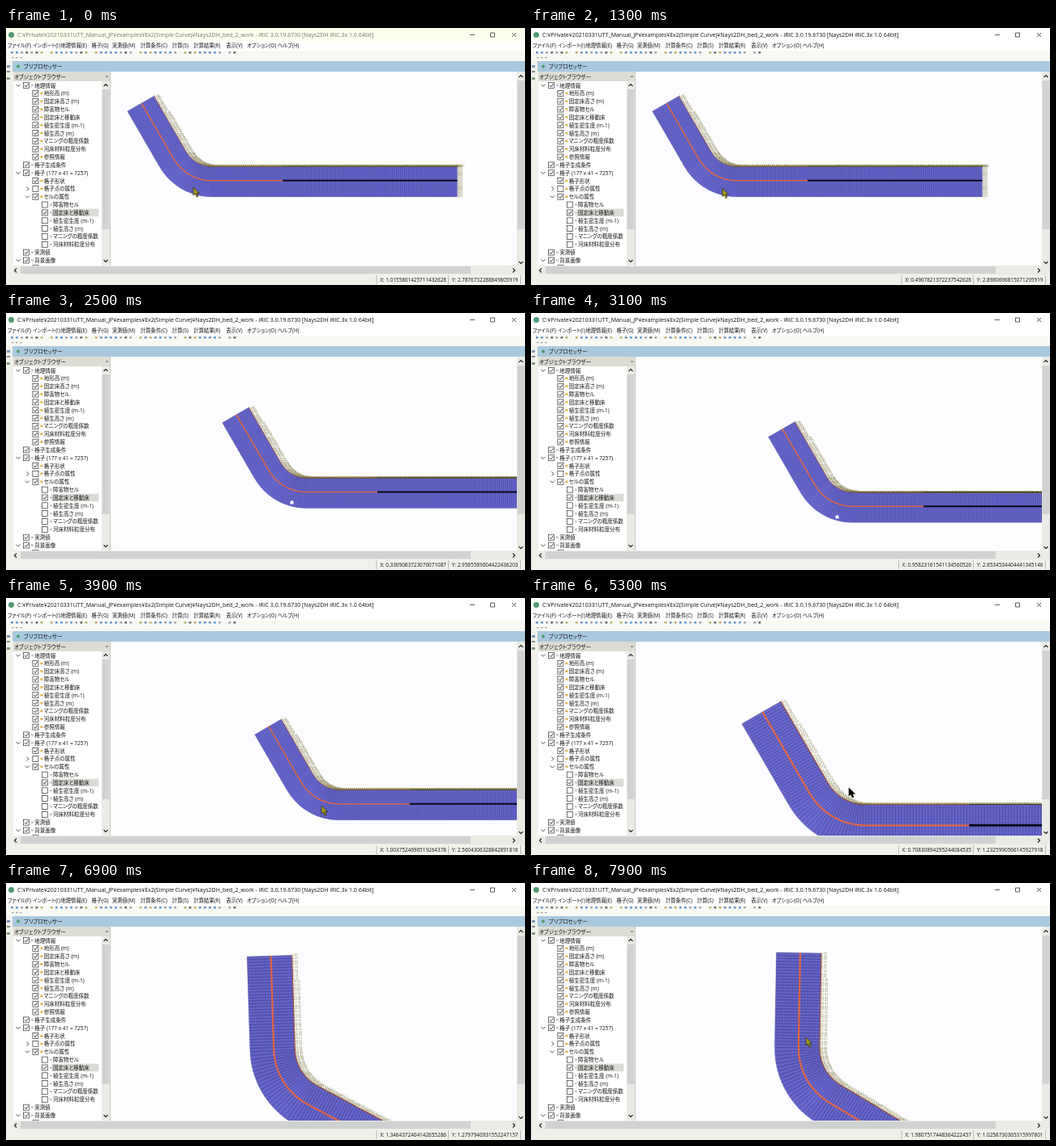
Animation of 640x318 px, one loop 8000 ms. Source, as an HTML page with a canvas:

```html
<!DOCTYPE html>
<html lang="ja">
<head>
<meta charset="utf-8">
<style>
  html, body { margin: 0; width: 100%; height: 100%; overflow: hidden; background: #fff; }
  canvas, svg { position: absolute; left: 0; top: 0; }
  text { font: 6.5px "Open Sans", "Noto Sans CJK JP", "Noto Sans CJK", sans-serif; font-feature-settings: "palt"; fill: #111; }
  .title { font-size: 6.97px; }
  .menu { font-size: 6.3px; }
  .status { font-size: 6.4px; text-anchor: end; }
</style>
</head>
<body>
<canvas id="view" width="640" height="318"></canvas>
<svg id="ui" width="640" height="318" viewBox="0 0 640 318"></svg>
<script>
const ctx = document.getElementById('view').getContext('2d');
const ui = document.getElementById('ui');

// ---- window chrome ----
const FACE = '#f1f1ec', TRACK = '#ebebe6', THUMB = '#d0d2d2';

function add(tag, attrs, content) {
  const el = document.createElementNS('http://www.w3.org/2000/svg', tag);
  for (const key in attrs) el.setAttribute(key, attrs[key]);
  if (content) el.textContent = content;
  return ui.appendChild(el);
}
const rect = (x, y, width, height, fill, extra) => add('rect', { x, y, width, height, fill, ...extra });
const line = (d, stroke = '#333', width = 0.8) => add('path', { d, stroke, 'stroke-width': width, fill: 'none' });
const label = (x, y, content, extra) => add('text', { x, y, ...extra }, content);

const titleBar = rect(0, 0, 640, 16, '#fff');
add('circle', { cx: 6.5, cy: 8.5, r: 3.5, fill: '#4f9a72' });
const title = label(14, 11, 'C:¥Private¥20210331UTT_Manual_JP¥examples¥Ex2(Simple Curve)¥Nays2DH_bed_2_work - iRIC 3.0.19.6730 [Nays2DH iRIC.3x 1.0 64bit]', { class: 'title' });
line('M572 8.5h6M597.5 6h5v5h-5zM624 6l5 5m0-5l-5 5');

rect(0, 16, 640, 12, '#fff');
[[2, 'ファイル(F)'], [33, 'インポート(I)'], [67.5, '地理情報(E)'], [105.5, '格子(G)'], [131, '実測値(M)'],
 [166, '計算条件(C)'], [205, '計算(S)'], [231.5, '計算結果(R)'], [271.5, '表示(V)'], [297, 'オプション(O)'],
 [335, 'ヘルプ(H)']].forEach(([x, name]) => label(x, 24.3, name, { class: 'menu' }));

rect(0, 28, 640, 13, '#f9f9f4');
const iconColors = ['#5d84b8', '#555', '#4b8fd0', '#b5a55a', '#8f9cab'];
for (let i = 0; i < 46; i++) {
  if (i % 9 !== 7) rect(6 + i * 6.1, 29.3, 2.8, 2.2, iconColors[(i * 7 + (i >> 2)) % 5]);
}
for (let i = 0; i < 3; i++) rect(7 + i * 5, 36.2, 2.5, 1, '#888');

rect(0, 41, 9, 264, FACE);
rect(1, 46, 4, 3, '#7b96b5');
rect(1, 53, 4, 2, '#888');
rect(1, 61, 4, 3, '#7f9b77');
rect(8, 41, 632, 13, '#a9c9de');
add('circle', { cx: 15, cy: 47.5, r: 2, fill: '#4f9a72' });
label(22, 50.3, 'プリプロセッサー');
rect(9, 54, 120, 12, '#dcdcd4');
label(10, 62.5, 'オブジェクトブラウザー');
rect(123, 59.5, 3, 1, '#555');
rect(10, 66, 108, 228, '#fff');
rect(118, 66, 10, 228, TRACK);
rect(118.5, 76, 9, 173, THUMB);
rect(128, 54, 1, 240, '#c9c9c4');
rect(630, 54, 10, 240, TRACK);
rect(630.5, 65, 9, 184, THUMB);
rect(9, 294, 631, 11, TRACK);
rect(18, 295, 555, 9, THUMB);
line('M120.5 72l2.5-2.5 2.5 2.5M120.5 287l2.5 2.5 2.5-2.5M632.5 61l2.5-2.5 2.5 2.5M632.5 289l2.5 2.5 2.5-2.5M13 297.5l-2.5 2.5 2.5 2.5M625 297.5l2.5 2.5-2.5 2.5', '#222', 1.1);

// Each row: indent level, checked, arrow (v open, > closed), name
const tree = `0 1 v 地理情報
1 1 - 地形高 (m)
1 1 - 固定床高さ (m)
1 1 - 障害物セル
1 1 - 固定床と移動床
1 1 - 植生密生度 (m-1)
1 1 - 植生高さ (m)
1 1 - マニングの粗度係数
1 1 - 河床材料粒度分布
1 1 - 参照情報
0 1 - 格子生成条件
0 1 v 格子 (177 x 41 = 7257)
1 1 - 格子形状
1 0 > 格子点の属性
1 1 v セルの属性
2 0 - 障害物セル
2 1 - 固定床と移動床
2 0 - 植生密生度 (m-1)
2 0 - 植生高さ (m)
2 0 - マニングの粗度係数
2 0 - 河床材料粒度分布
0 1 - 実測値
0 1 v 背景画像`;
tree.split('\n').forEach((row, i) => {
  const [, level, checked, arrow, name] = row.match(/(\d) (\d) (\S) (.*)/);
  const x = 25 + level * 11.4, y = 71 + i * 9.84;
  if (i === 16) rect(x + 8.5, y - 4.8, 58, 9.6, '#dadad6');
  rect(x - 3.5, y - 3.5, 7, 7, '#fff', { stroke: '#333', 'stroke-width': 0.7 });
  if (+checked) line(`M${x - 2} ${y}l1.6 1.8 2.8-3.7`, '#222', 0.9);
  if (arrow === 'v') line(`M${x - 12.5} ${y - 1.2}l2.5 2.5 2.5-2.5`, '#222');
  if (arrow === '>') line(`M${x - 11} ${y - 2.5}l2.5 2.5-2.5 2.5`, '#222');
  rect(x + 6, y - 1.3, 3, 2.6, level === '1' ? '#d8b94a' : '#c5cbd0');
  label(x + 10.3, y + 2.5, name);
});
line('M33 294.3v-1h7v1', '#333', 0.7);

rect(0, 305, 640, 13, FACE);
const divider = line('M457.5 306v11', '#aaa');
line('M545.5 306v11M634.5 306v11', '#aaa');
const statusX = label(543, 313.6, '', { class: 'status' });
const statusY = label(631.5, 313.6, '', { class: 'status' });

// ---- channel geometry: d runs downstream, n towards the inner bank ----
const HALF = 18.9, RADIUS = 55, REACH = 79.5, ARC = RADIUS * Math.PI / 3;
const TOTAL = REACH + ARC + 303, BREAK = REACH + ARC + 87.5, CELL = TOTAL / 176;

function channel(d, n) {
  if (d < REACH) return [166 + 0.5 * d + 0.866 * n, 93.3 + 0.866 * d - 0.5 * n];
  if (d < REACH + ARC) {
    const a = Math.PI * 5 / 6 - (d - REACH) / RADIUS, r = RADIUS - n;
    return [253.5 + r * Math.cos(a), 134.7 + r * Math.sin(a)];
  }
  return [253.5 + d - REACH - ARC, 189.7 - n];
}
function bankLine(n, from, to) {
  const path = new Path2D();
  for (let d = from; d < to; d += CELL) path.lineTo(...channel(d, n));
  path.lineTo(...channel(to, n));
  return path;
}
const body = bankLine(HALF, 0, TOTAL);
for (let i = 176; i >= 0; i--) body.lineTo(...channel(i * CELL, -HALF));
const cross = new Path2D(), along = new Path2D();
for (let i = 0; i <= 176; i++) {
  cross.moveTo(...channel(i * CELL, -HALF));
  cross.lineTo(...channel(i * CELL, HALF));
}
for (let j = 0; j <= 40; j++) along.addPath(bankLine(-HALF + j * HALF / 20, 0, TOTAL));
const innerBank = bankLine(HALF, 0, BREAK), innerRest = bankLine(HALF, BREAK, TOTAL);
const movable = bankLine(1.2, 0, BREAK), fixed = bankLine(1.2, BREAK, TOTAL);

const tags = [];
for (let i = 0; i < 176; i++) tags.push([channel(i * CELL, HALF), `${i + 1},41`]);
for (let j = 0; j <= 40; j += 2) tags.push([channel(TOTAL, -HALF + j * HALF / 20), '177']);

// ---- motion ----
// time, pan x, pan y, zoom, turn in degrees
const poses = [
  [0, 0, 0.3, 1, 0], [1600, 0, 0.3, 1, 0], [1700, 7, 3, 1, 0], [1900, 84, 23.5, 1, 0], [2500, 117, 33, 1, 0],
  [2600, 117, 33, 1, 0], [3100, 143, 50.7, 1, 0], [3500, 136, 57, 1, 0], [3900, 157, 66.2, 1, 0],
  [4400, 157, 66.2, 1, 0], [5300, 157, 66.2, 1.465, 0], [5400, 157, 66.2, 1.465, 0], [6100, 157, 66.2, 1.465, 3],
  [6300, 157, 66.2, 1.465, 15], [6700, 157, 66.2, 1.465, 27], [6800, 157, 66.2, 1.465, 27],
  [7300, 157, 66.2, 1.465, 33], [7700, 157, 66.2, 1.465, 31]
];
// time, pointer x, pointer y
const pointer = [
  [0, 231, 197], [900, 231, 197], [1700, 241, 200], [1900, 325, 221], [2500, 352, 234], [2600, 352, 234],
  [3100, 377, 252], [3500, 370, 257], [3900, 389, 257], [4400, 392, 270], [5300, 392, 235], [5500, 392, 235],
  [7700, 339, 191]
];
const readout = [
  [0, '1.0155801425711432628', '2.7876732288849805919'],
  [900, '1.0155801425711432628', '2.7876732288849805919'],
  [1900, '-0.296414870797331087', '3.0636643604403506203'],
  [3100, '0.95823161541134560526', '2.8534534404441345146'],
  [3900, '1.0037524696519264378', '2.5604306328842891816'],
  [5300, '0.70830894295244084535', '1.2325990566145927918'],
  [5400, '0.70830894295244084535', '1.2325990566145927918'],
  [6100, '0.83898563687654015286', '1.4829309384541227157'],
  [7900, '1.9807517448364222457', '1.0258730365315997801']
];
function span(keys, t) {
  let i = 0;
  while (i < keys.length - 1 && keys[i + 1][0] <= t) i++;
  const a = keys[i], b = keys[i + 1] || a;
  return [a, b, a === b ? 0 : (t - a[0]) / (b[0] - a[0])];
}
function at(keys, t) {
  const [a, b, k] = span(keys, t);
  return a.map((v, i) => v + (b[i] - v) * k);
}
function readoutAt(t) {
  const [a, b, k] = span(readout, t);
  return [1, 2].map(i => k === 0 || a[i] === b[i] ? a[i]
    : (+a[i] + (b[i] - a[i]) * k).toFixed(15) + a[i].slice(-4));
}

function stroke(path, color, width) {
  ctx.strokeStyle = color;
  ctx.lineWidth = width;
  ctx.stroke(path);
}
function drawPointer(t) {
  if (t >= 5500 && t < 7700) return;
  const [, x, y] = at(pointer, t);
  ctx.setTransform(1, 0, 0, 1, x, y);
  if (t >= 1700 && t < 3500) {
    ctx.fillStyle = '#fff';
    ctx.fillRect(-1.5, -1, 4, 3.5);
    ctx.fillRect(-0.5, -2, 2, 1);
    return;
  }
  const arrow = new Path2D('M0 0V10L2.4 8 4.2 12 6 11.2 4.3 7.3H7.5Z');
  ctx.fillStyle = t >= 4400 && t < 5500 ? '#000' : '#a09c20';
  ctx.fill(arrow);
  stroke(arrow, '#26260c', 0.7);
}
function draw(t) {
  const [, dx, dy, zoom, turn] = at(poses, t);
  ctx.setTransform(1, 0, 0, 1, 0, 0);
  ctx.fillStyle = '#fdfdff';
  ctx.fillRect(0, 0, 640, 318);
  ctx.save();
  ctx.beginPath();
  ctx.rect(129, 54, 501, 240);
  ctx.clip();
  ctx.translate(407, 197.5);
  ctx.rotate(turn * Math.PI / 180);
  ctx.scale(zoom, zoom);
  ctx.translate(dx - 407, dy - 197.5);
  const m = ctx.getTransform();
  ctx.fillStyle = '#7474e2';
  ctx.fill(body);
  stroke(along, 'rgba(24,24,70,.5)', 0.3);
  stroke(cross, 'rgba(24,24,70,.45)', 0.45);
  stroke(innerRest, '#22221a', 1);
  stroke(innerBank, '#a04a34', 0.8);
  stroke(movable, '#dc6448', 1.6);
  stroke(fixed, '#080818', 2.1);
  ctx.setTransform(1, 0, 0, 1, 0, 0);
  ctx.font = '3.6px "Liberation Sans", sans-serif';
  ctx.textBaseline = 'middle';
  ctx.fillStyle = 'rgba(104,98,30,.75)';
  for (const [[x, y], name] of tags) ctx.fillText(name, m.a * x + m.c * y + m.e + 0.5, m.b * x + m.d * y + m.f);
  drawPointer(t);
  ctx.restore();

  const active = t >= 900;
  titleBar.setAttribute('fill', active ? '#fff' : '#fefeee');
  title.style.fill = active ? '#111' : '#77776a';
  const [x, y] = readoutAt(t);
  statusX.textContent = 'X: ' + x;
  statusY.textContent = 'Y: ' + y;
  divider.setAttribute('d', `M${540 - (x.length + 3) * 3.46} 306v11`);
}
function frame() {
  draw(Math.floor(performance.now() % 8000 / 100) * 100);
  requestAnimationFrame(frame);
}
frame();
</script>
</body>
</html>
```
